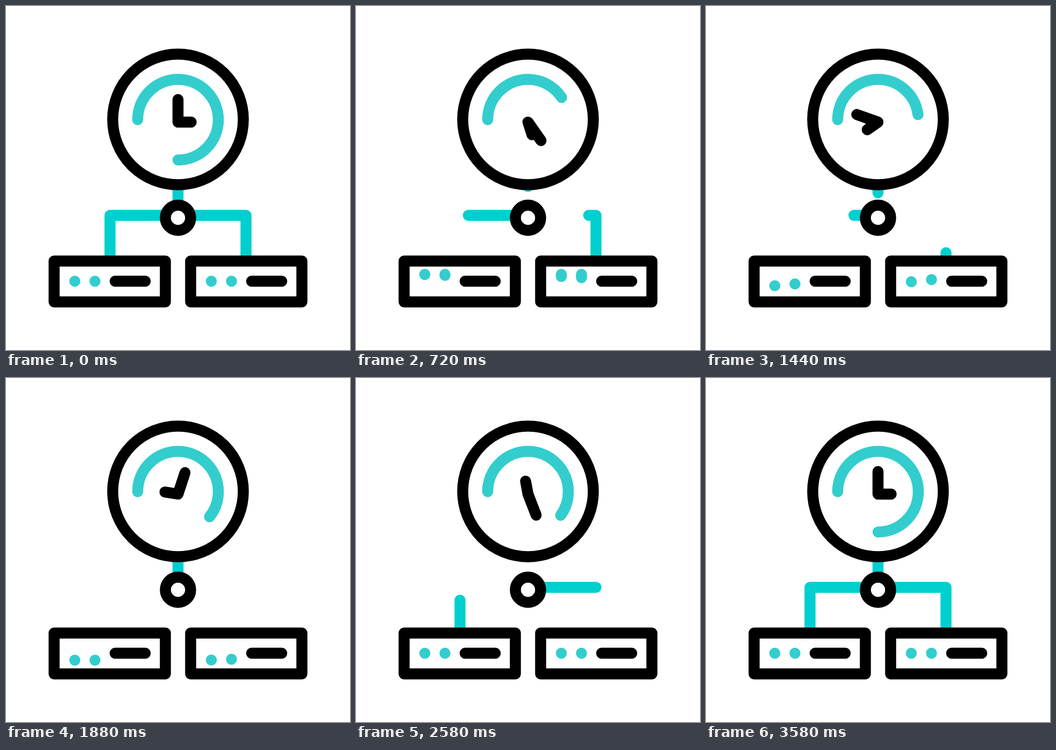
These frames come from a looping animation (640 px wide and 640 px high, 3.6 s). An HTML page with a canvas:

```html
<!DOCTYPE html>
<html lang="en">
<head>
<meta charset="utf-8">
<title>Server clock</title>
<style>
  html, body { margin: 0; width: 100%; height: 100%; overflow: hidden; background: #fff; }
  canvas { display: block; width: 640px; height: 640px; }
</style>
</head>
<body>
<canvas id="stage" width="640" height="640"></canvas>
<script>
const ctx = document.getElementById('stage').getContext('2d');
const LOOP = 3600, STEP = 20, LAST = LOOP - STEP;
const BLACK = '#000', CYAN = '#00cfcf', SOFT = '#33cdcd';
const TAU = Math.PI * 2;

// Monotone cubic curve through [time, value] points
function curve(points) {
  const secant = i => (points[i + 1][1] - points[i][1]) / (points[i + 1][0] - points[i][0]);
  const slopes = points.map((_, i) => {
    if (i === 0) return secant(0);
    if (i === points.length - 1) return secant(i - 1);
    const a = secant(i - 1), b = secant(i);
    return a * b > 0 ? 2 * a * b / (a + b) : 0;
  });
  return t => {
    if (t <= points[0][0]) return points[0][1];
    const i = points.findIndex(p => p[0] >= t) - 1;
    if (i < 0) return points[points.length - 1][1];
    const [t0, v0] = points[i], [t1, v1] = points[i + 1];
    const d = t1 - t0, u = (t - t0) / d, w = 1 - u;
    return w * w * ((1 + 2 * u) * v0 + u * d * slopes[i])
         + u * u * ((1 + 2 * w) * v1 - w * d * slopes[i + 1]);
  };
}

function ease(t, start, duration) {
  const u = Math.min(1, Math.max(0, (t - start) / duration));
  return u * u * (3 - 2 * u);
}

const arcSweep = curve([[0, 270], [460, 181.5], [1000, 127], [1880, 218.5],
                        [2580, 215.8], [3040, 223.4], [LAST, 270]]);

// Connector positions are distances along the path from the hub
const NEAR = 20, FAR = 212;
const leftOut = curve([[0, 205], [460, 141.5], [1000, 82], [1750, NEAR]]);
const rightOut = curve([[0, NEAR], [460, 76.5], [1000, 150.5], [1600, FAR]]);
const leftIn = curve([[2000, FAR], [2580, 150.5], [3040, 95.5], [LAST, NEAR]]);
const rightIn = curve([[1900, NEAR], [2580, 126.5], [3040, 165.5], [LAST, 205]]);
const stemEnd = curve([[0, 372], [460, 349.5], [900, 331], [1200, 331],
                       [1750, 372], [2000, 372], [2580, 333], [2680, 331]]);
const stemStart = curve([[2700, 372], [3040, 360], [LAST, 333]]);

function line(points, color) {
  ctx.strokeStyle = color;
  ctx.beginPath();
  points.forEach(([x, y]) => ctx.lineTo(x, y));
  ctx.stroke();
}

function ring(x, y, r) {
  ctx.fillStyle = '#fff';
  ctx.strokeStyle = BLACK;
  ctx.beginPath();
  ctx.arc(x, y, r, 0, TAU);
  ctx.fill();
  ctx.stroke();
}

function connector(side, from, to) {
  if (to - from < 0.5 || to <= NEAR || from >= FAR) return;
  const bend = 126.5;
  const at = s => [320 + side * Math.min(s, bend), 389.5 + Math.max(0, s - bend)];
  const points = [at(from)];
  if (from < bend && to > bend) points.push(at(bend));
  points.push(at(to));
  line(points, CYAN);
}

function dot(x, index, t) {
  const y = lag => 512
    - 12.8 * ease(t - lag, 80 + index * 60, 460)
    + 25.8 * ease(t, 680 + index * 110, 1030)
    - 13 * ease(t, 1960 + index * 25, 500);
  const lead = y(0), trail = y(230);
  line([[x, lead], [x, trail + 0.01]], SOFT);
}

function server(x, firstDot, t) {
  ctx.fillStyle = '#fff';
  ctx.strokeStyle = BLACK;
  ctx.beginPath();
  ctx.rect(x, 474.5, 207, 76);
  ctx.fill();
  ctx.stroke();
  dot(x + 38.5, firstDot, t);
  dot(x + 76, firstDot + 1, t);
  line([[x + 113.5, 512], [x + 169.5, 512]], BLACK);
}

function handTip(turns, length) {
  const a = turns * TAU;
  return [320 + length * Math.sin(a), 216 - length * Math.cos(a)];
}

function draw(t) {
  ctx.fillStyle = '#fff';
  ctx.fillRect(0, 0, 640, 640);
  ctx.lineWidth = 20.5;
  ctx.lineCap = ctx.lineJoin = 'round';

  if (t < LAST / 2) {
    connector(-1, NEAR, leftOut(t));
    connector(1, rightOut(t), FAR);
  } else {
    connector(-1, leftIn(t), FAR);
    connector(1, NEAR, rightIn(t));
  }
  const stem = t < 2690 ? [331, stemEnd(t)] : [stemStart(t), 372];
  line(stem.map(y => [320, y]), CYAN);

  ring(320, 211, 121.5);
  ring(320, 394, 23.5);

  ctx.strokeStyle = SOFT;
  ctx.beginPath();
  ctx.arc(320, 211.5, 75, Math.PI, Math.PI + arcSweep(t) / 360 * TAU);
  ctx.stroke();

  const turn = t / LAST;
  line([handTip(turn * 2, 42), [320, 216], handTip(0.25 + turn, 24.5)], BLACK);

  server(89.5, 0, t);
  server(342.5 + 1, 2, t);
}

const began = performance.now();
function tick() {
  const t = (performance.now() - began) % LOOP;
  draw(Math.floor(t / STEP) * STEP);
  requestAnimationFrame(tick);
}
tick();
</script>
</body>
</html>
```
